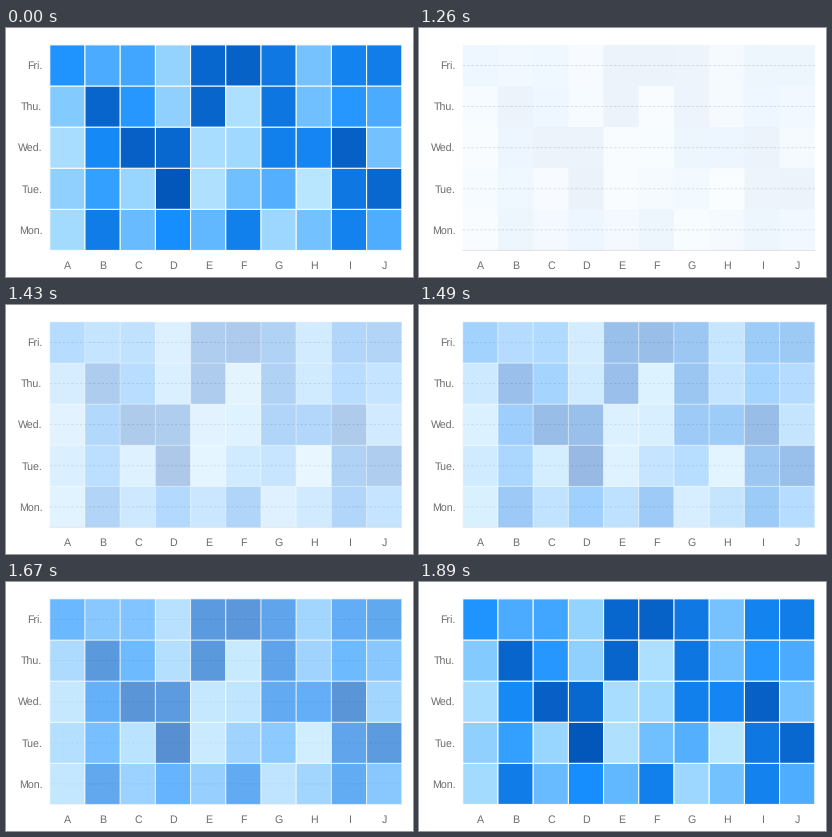
Write a matplotlib script that moves like this. It is 407 by 249 pixels and loops after 3740 ms.

```python
import matplotlib.pyplot as plt
from matplotlib.animation import FuncAnimation
from matplotlib.collections import PolyCollection
from matplotlib.colors import LinearSegmentedColormap

plt.rcParams["text.hinting"] = "no_hinting"

W, H = 407, 249
LOOP, STEP = 3740, 10
X0, Y0, CW, CH = 43.8, 16.9, 35.2, 41.1
DAYS = ["Mon.", "Tue.", "Wed.", "Thu.", "Fri."]
COLS = "ABCDEFGHIJ"
VALUES = [  # one list per column, Monday first
    [10, 19, 8, 24, 67], [92, 58, 78, 117, 48], [35, 15, 123, 64, 52],
    [72, 132, 114, 19, 16], [38, 5, 8, 117, 115], [88, 32, 12, 6, 120],
    [13, 44, 88, 98, 96], [31, 1, 82, 32, 30], [85, 97, 123, 64, 84],
    [47, 114, 31, 48, 91],
]
TOP_VALUE = 140
BLUES = LinearSegmentedColormap.from_list("blues", ["#bae7ff", "#1890ff", "#0050b3"])

# A blank pause, then a linear fade shown in even steps
BLANK, FADE, FULL, STEPS = 1080, 1260, 1890, 11
FIRST_ALPHA = 0.075

fig = plt.figure(figsize=((W + 0.01) / 72, (H + 0.01) / 72), dpi=72, facecolor="white")
ax = fig.add_axes([0, 0, 1, 1])
ax.set_xlim(0, W)
ax.set_ylim(H, 0)
ax.axis("off")

right, bottom = X0 + len(COLS) * CW, Y0 + len(DAYS) * CH
font = dict(family="Liberation Sans", size=10.6, color="#6c6c6c", va="baseline")


def row_top(day):
    return Y0 + (len(DAYS) - 1 - day) * CH


def cell(col, day):
    x, y = X0 + col * CW, row_top(day)
    return [(x, y), (x + CW, y), (x + CW, y + CH), (x, y + CH)]


def rule(y, color, **style):
    return ax.plot([X0, right], [y, y], color=color, lw=0.9, snap=False,
                   zorder=1, **style)


parts = rule(bottom, "#e2e2e2")
for day, name in enumerate(DAYS):
    mid = row_top(day) + CH / 2
    parts += rule(mid, "#dedede", dashes=(2.6, 2.2), dash_capstyle="butt")
    parts.append(ax.text(36.4, mid + 4, name, ha="right", **font))
for col, name in enumerate(COLS):
    parts.append(ax.text(X0 + (col + 0.5) * CW, 241, name, ha="center", **font))

cells = PolyCollection(
    [cell(c, d) for c in range(len(COLS)) for d in range(len(DAYS))],
    facecolors=[BLUES(v / TOP_VALUE) for column in VALUES for v in column],
    edgecolors="white", linewidths=1, snap=False, zorder=2)
ax.add_collection(cells, autolim=False)
parts.append(cells)


def opacity(t):
    if t < BLANK or t >= FULL:
        return 1.0
    if t < FADE:
        return 0.0
    done = int((t - FADE) / (FULL - FADE) * STEPS + 0.09) / STEPS
    return FIRST_ALPHA + (1 - FIRST_ALPHA) * done


def update(frame):
    alpha = opacity(frame * STEP)
    for part in parts:
        part.set_visible(alpha > 0)
    cells.set_alpha(alpha)
    return parts


anim = FuncAnimation(fig, update, frames=LOOP // STEP, interval=STEP,
                     repeat=True, repeat_delay=0, blit=False)
plt.show()
```
